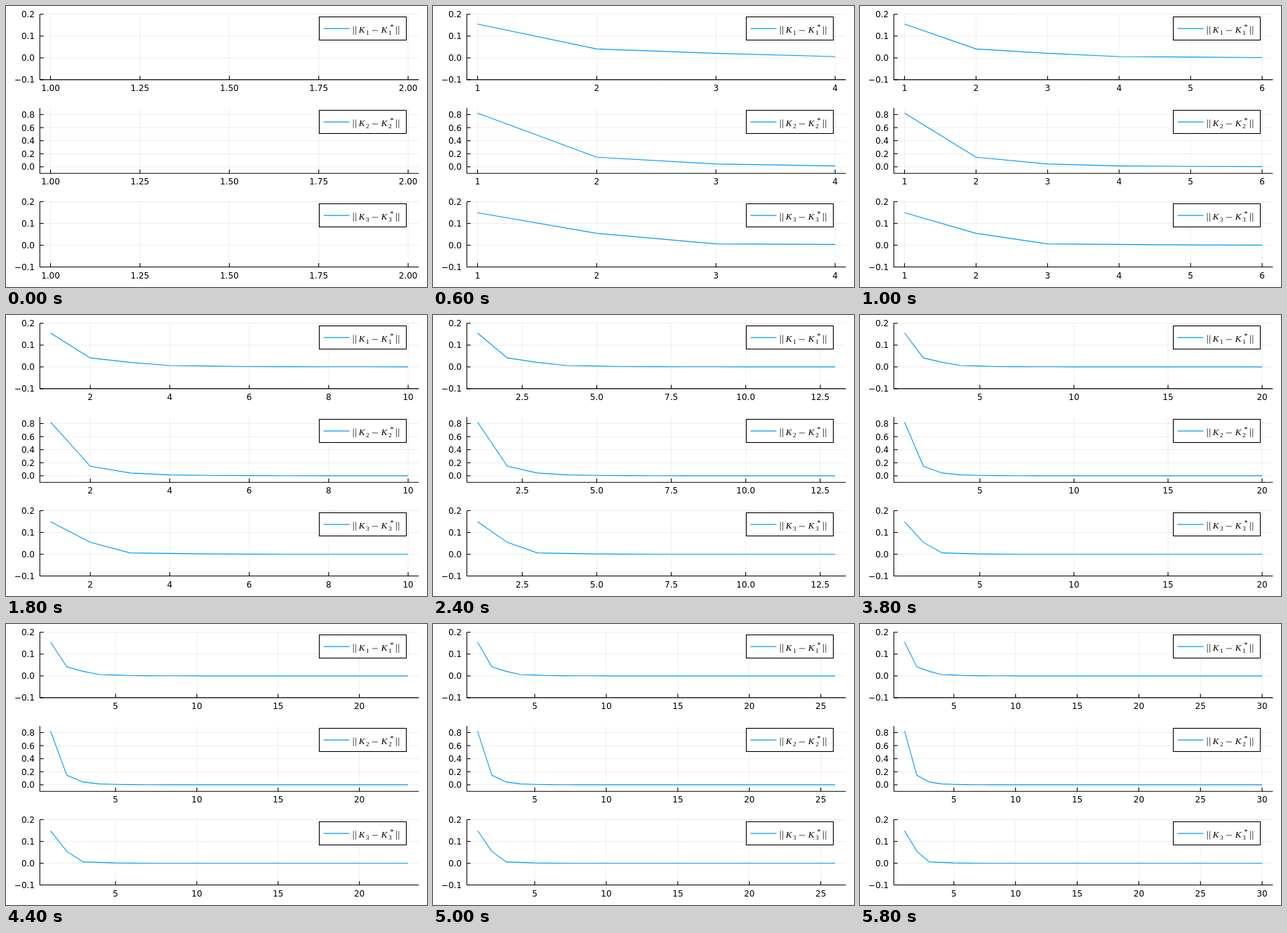
Write an HTML page with a canvas that moves like this. It is 600x400 px and loops after 6000 ms.

```html
<!DOCTYPE html>
<html lang="en">
<head>
<meta charset="utf-8">
<title>Convergence</title>
<style>
  html, body { margin: 0; width: 100%; height: 100%; overflow: hidden; background: #fff; }
  canvas { display: block; width: 600px; height: 400px; }
</style>
</head>
<body>
<canvas id="stage" width="600" height="400"></canvas>
<script>
const ctx = document.getElementById("stage").getContext("2d");
const STEP = 200, COUNT = 30;
const LEFT = 48.2, RIGHT = 588.4, FIRST = 63.5, LAST = 573.1;
const BLUE = "#009afa";

const panels = [
  { top: 11.8, bottom: 104.9, min: -0.1, max: 0.2, gap: 0.1,
    values: [0.155, 0.041, 0.021, 0.006, 0.004, 0.0014, 0.0008] },
  { top: 145.2, bottom: 238.2, min: -0.1, max: 0.9, gap: 0.2,
    values: [0.822, 0.146, 0.043, 0.014, 0.0075, 0.003, 0.0012] },
  { top: 278.5, bottom: 371.5, min: -0.1, max: 0.2, gap: 0.1,
    values: [0.149, 0.0545, 0.006, 0.0035, 0.0011, 0.0004, 0.0002] }
];

function valueAt(values, i) {
  const end = values.length - 1;
  return i <= end ? values[i] : values[end] * 0.5 ** (i - end);
}

function line(points, color, width = 1) {
  ctx.beginPath();
  points.forEach(([x, y], i) => i ? ctx.lineTo(x, y) : ctx.moveTo(x, y));
  ctx.strokeStyle = color;
  ctx.lineWidth = width;
  ctx.stroke();
}

function text(label, x, y, font, align = "left") {
  ctx.font = font;
  ctx.textAlign = align;
  ctx.fillStyle = "#000";
  ctx.fillText(label, x, y);
}

// Tick spacing on the horizontal axis for n points
function spacing(n) {
  if (n < 3) return 0.25;
  if (n < 4) return 0.5;
  if (n < 8) return 1;
  if (n < 12 || n === 15) return 2;
  if (n === 16 || n === 17) return 3;
  return n < 20 ? 2.5 : 5;
}

function ticks(min, max, gap) {
  const list = [];
  for (let i = Math.ceil(min / gap - 1e-6); i * gap <= max + 1e-6; i++) list.push(i * gap);
  return list;
}

function label(v, digits) {
  return (v < -1e-6 ? "\u2212" : "") + Math.abs(v).toFixed(digits);
}

function legend(top, index) {
  const math = '"Liberation Serif", serif';
  const x = 446.5, y = Math.round(top + 2.7) + 0.5, base = y + 22.6;
  ctx.fillStyle = "#fff";
  ctx.fillRect(x, y, 124, 33);
  ctx.strokeStyle = "#000";
  ctx.lineWidth = 1.1;
  ctx.strokeRect(x, y, 124, 33);
  line([[452.5, y + 16.6], [489.5, y + 16.6]], BLUE, 1.1);
  for (const bar of [495.2, 498.6, 556.4, 559.8])
    line([[bar, y + 13], [bar, y + 25.4]], "#000", 0.7);
  for (const [k, sub] of [[502.8, 513], [534.8, 545.2]]) {
    text("K", k, base, "italic 13px " + math);
    text(index, sub, base + 2.4, "9px " + math);
  }
  line([[521.6, base - 3.2], [530, base - 3.2]], "#000", 0.7);
  text("*", 547.4, base - 5.4, "10px " + math);
}

function drawPanel(p, n, index) {
  const end = Math.max(n, 2), gap = spacing(n);
  const margin = 0.03 * (end - 1);
  const toX = v => FIRST + (v - 1) / (end - 1) * (LAST - FIRST);
  const toY = v => p.bottom - (v - p.min) / (p.max - p.min) * (p.bottom - p.top);
  const xs = ticks(1 - margin, end + margin, gap);
  const ys = ticks(p.min, p.max, p.gap);
  const digits = gap === 0.25 ? 2 : gap % 1 ? 1 : 0;
  const font = '12px "DejaVu Sans", sans-serif';

  for (const v of xs) line([[toX(v), p.top], [toX(v), p.bottom]], "rgba(0,0,0,.065)");
  for (const v of ys) line([[LEFT, toY(v)], [RIGHT, toY(v)]], "rgba(0,0,0,.065)");

  line([[LEFT, p.bottom], [RIGHT, p.bottom]], "#000", 1.1);
  line([[LEFT, p.top], [LEFT, p.bottom]], "#000", 1.1);
  for (const v of xs) {
    line([[toX(v), p.bottom], [toX(v), p.bottom - 5.4]], "#000", 1.1);
    text(label(v, digits), toX(v), p.bottom + 16, font, "center");
  }
  for (const v of ys) {
    line([[LEFT, toY(v)], [LEFT + 5.4, toY(v)]], "#000", 1.1);
    text(label(v, 1), 41, toY(v) + 4.4, font, "right");
  }

  if (n > 1) {
    const points = Array.from({ length: n }, (_, i) => [toX(i + 1), toY(valueAt(p.values, i))]);
    line(points, BLUE, 1.1);
  }
  legend(p.top, index);
}

function draw(now) {
  const n = Math.floor(now / STEP) % COUNT + 1;
  ctx.fillStyle = "#fff";
  ctx.fillRect(0, 0, 600, 400);
  panels.forEach((p, i) => drawPanel(p, n, i + 1));
}

const start = performance.now();
function frame() {
  draw(performance.now() - start);
  requestAnimationFrame(frame);
}
frame();
</script>
</body>
</html>
```
